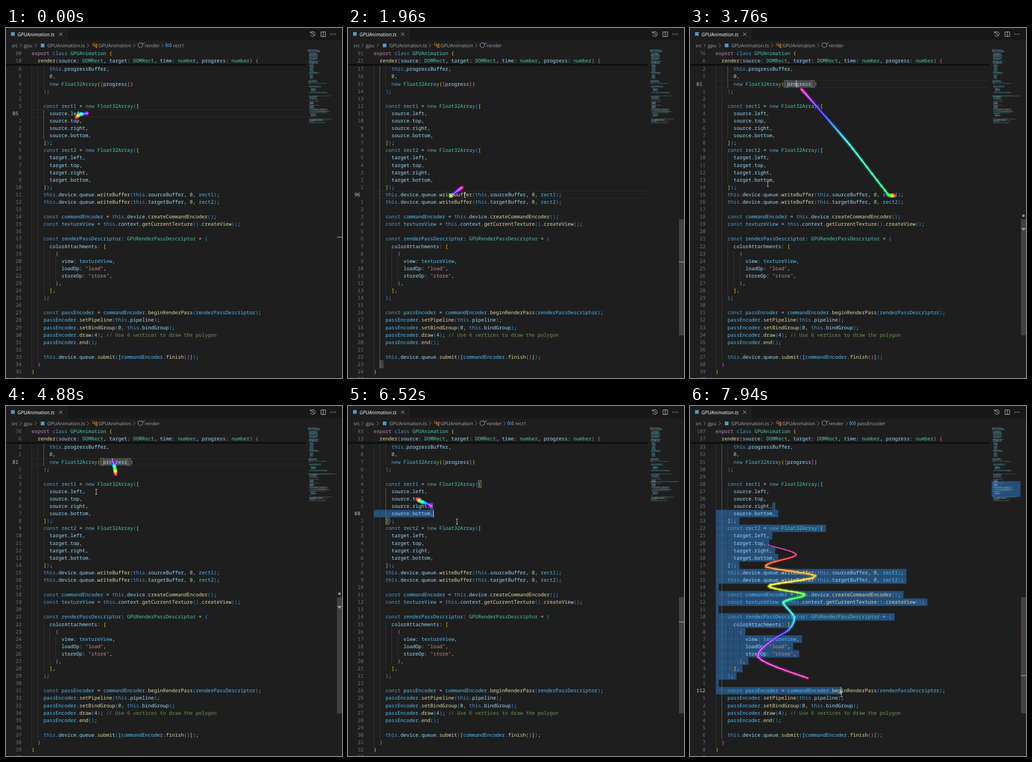
These frames come from a looping animation (734x763 px, 8000 ms). An HTML page:

```html
<!DOCTYPE html>
<html lang="en">
<head>
<meta charset="utf-8">
<title>Editor cursor trail</title>
<style>
  html, body { margin: 0; width: 100%; height: 100%; overflow: hidden; background: #1e1e1e; }
  svg { display: block; width: 734px; height: 763px; }
  text { white-space: pre; text-rendering: geometricPrecision; }
  .code { font: 10.86px "Noto Sans Mono", monospace; fill: #d4d4d4; }
  .ui { font: 10.4px "Open Sans", sans-serif; fill: #a9a9a9; }
  .tab { font: italic 10.9px "Open Sans", sans-serif; fill: #fff; }
  .num { fill: #6e7681; text-anchor: end; }
  .icon { fill: none; stroke: #ccc; }
</style>
</head>
<body>
<svg viewBox="0 0 734 763">
  <rect width="734" height="763" fill="#1e1e1e"/>
  <g id="under"></g>
  <g id="lines" class="code"></g>
  <g id="dots" class="code"></g>
  <g id="over"></g>
  <g id="top"></g>
  <g id="gutter" class="code"></g>
  <g id="crumb" class="ui"></g>
  <g id="minimap"></g>
  <g id="ruler"></g>
  <g id="trail" fill="none" stroke-linecap="round"></g>
  <path id="mouse" d="M-2-5.500h4M0-5.500v11M-2 5.500h4" fill="none" stroke="#ddd"/>
</svg>
<script>
const LOOP = 8000, X0 = 56, CW = 6.516, ROW = 16.09, FIRST = 79, LAG = 500, SEGMENTS = 90;
const $ = id => document.getElementById(id);

const code = `      this.progressBuffer,
      0,
      new Float32Array([progress])
    );

    const rect1 = new Float32Array([
      source.left,
      source.top,
      source.right,
      source.bottom,
    ]);
    const rect2 = new Float32Array([
      target.left,
      target.top,
      target.right,
      target.bottom,
    ]);
    this.device.queue.writeBuffer(this.sourceBuffer, 0, rect1);
    this.device.queue.writeBuffer(this.targetBuffer, 0, rect2);

    const commandEncoder = this.device.createCommandEncoder();
    const textureView = this.context.getCurrentTexture().createView();

    const renderPassDescriptor: GPURenderPassDescriptor = {
      colorAttachments: [
        {
          view: textureView,
          loadOp: "load",
          storeOp: "store",
        },
      ],
    };

    const passEncoder = commandEncoder.beginRenderPass(renderPassDescriptor);
    passEncoder.setPipeline(this.pipeline);
    passEncoder.setBindGroup(0, this.bindGroup);
    passEncoder.draw(4); // Use 6 vertices to draw the polygon
    passEncoder.end();

    this.device.queue.submit([commandEncoder.finish()]);
  }
}
`.split("\n");
const sticky = ["export class GPUAnimation {",
  "  render(source: DOMRect, target: DOMRect, time: number, progress: number) {"];
const indents = code.map((s, r) => s ? s.search(/\S/) : r < code.length - 1 ? 4 : 0);

const colX = c => X0 + c * CW;
const rowY = r => 81.6 + r * ROW;
const baseY = r => rowY(r) + 11.8;
const rulerY = line => 509 + (line - 96) * 4.87;
const mapY = line => 47 + (line - 1) * 1.36;
const clamp = (v, lo = 0, hi = 1) => Math.min(hi, Math.max(lo, v));
const rect = (x, y, w, h, fill, more = "") =>
  `<rect x="${x}" y="${y}" width="${w}" height="${h}" fill="${fill}" ${more}/>`;
const label = (x, y, s, more = "") => `<text x="${x}" y="${y}" ${more}>${s}</text>`;
const icon = (d, color = "#ccc") => `<path class="icon" style="stroke:${color}" d="${d}"/>`;

const cache = {};
function put(id, html) {
  if (cache[id] !== html) $(id).innerHTML = cache[id] = html;
}

// Syntax colours
const keywords = /^(class|const|new|this)$/;
const types = /^(DOMRect|number|Float32Array|GPU\w+)$/;
const consts = /^(rect[12]|commandEncoder|textureView|renderPassDescriptor|passEncoder)$/;
const bracketColors = ["#ffd700", "#da70d6", "#179fff"];
let depth = 0;

function tokenColor(s, next) {
  if (s.startsWith("//")) return "#6a9955";
  if (s[0] === '"') return "#ce9178";
  if (/[([{]/.test(s)) return bracketColors[depth++ % 3];
  if (/[)\]}]/.test(s)) return bracketColors[--depth % 3];
  if (/^\d/.test(s)) return "#b5cea8";
  if (!/^\w/.test(s)) return "#d4d4d4";
  if (s === "export") return "#c586c0";
  if (keywords.test(s)) return "#569cd6";
  if (types.test(s)) return "#4ec9b0";
  if (next === "(") return "#dcdcaa";
  return consts.test(s) ? "#4fc1ff" : "#9cdcfe";
}
function tokens(line) {
  const parts = line.match(/\/\/.*|"[^"]*"|[()[\]{}]|\w+|[^\w"()[\]{}\/]+/g) || [];
  return parts.map((s, i) => ({ s, color: tokenColor(s, parts[i + 1]) }));
}
const paint = list => list.map(k => `<tspan fill="${k.color}">${k.s}</tspan>`).join("");

const stickyTokens = sticky.map(tokens);
depth = 3;
const lineTokens = code.map(tokens);
put("lines", lineTokens.map((l, i) => label(X0, baseY(i), paint(l))).join(""));

// Window chrome and sticky header
const chevron = x => icon(`M${x - 2} 34l4 4l-4 4`, "#8a8a8a");
const square = (x, y) => rect(x, y, 8, 8, "#519aba");
put("top",
  rect(0, 0, 734, 81, "#1e1e1e") + rect(133, 0, 601, 27, "#181818") + rect(132, 0, 1, 27, "#2b2b2b") +
  rect(0, 79, 654, 2, "#080808") + rect(0, 81, 654, 1.5, "#151515") +
  square(11, 9) + label(25, 17.5, "GPUAnimation.ts", 'class="tab"') +
  icon("M116 10l7 7m0-7l-7 7") +
  icon("M666 10a5.2 5.2 0 1 1-.6 5M665 7v4h4M670.5 10v4l3 1.5") +
  icon("M688 8.5h10v10h-10zM693 8.5v10") +
  `<path d="M710 13.500h10" stroke="#ccc" stroke-width="2" stroke-linecap="round" stroke-dasharray="0 4.500"/>` +
  `<g class="ui">` + label(12, 42, "src") + label(39, 42, "gpu") + square(76, 34) +
  label(90, 42, "GPUAnimation.ts") + label(202, 42, "GPUAnimation") + label(303, 42, "render") + `</g>` +
  [32, 65, 179, 280].map(chevron).join("") +
  icon("M188 36l3.5-3.5l3 3l-3.5 3.5zM193 37h3M194 37v4h2M197 35h2v3h-2zM197 40h2v3h-2z", "#ee9d28") +
  icon("M293.5 32l5 2.5v5.5l-5 3l-5-3v-5.5zl5 2.5l5-2.5", "#b9a0dc") +
  `<g class="code">` + stickyTokens.map((l, i) => label(X0, 58.8 + i * 16, paint(l))).join("") + `</g>`);

// Minimap: [first line, count, indent, length]
const blocks = [[1, 4, 0, 42], [6, 12, 4, 30], [19, 5, 3, 36], [25, 12, 6, 14], [37, 3, 4, 34],
  [41, 7, 6, 12], [50, 4, 2, 34], [55, 1, 2, 74], [59, 3, 4, 40], [63, 5, 10, 18], [69, 2, 4, 70],
  [75, 1, 2, 76], [76, 3, 4, 28]];
const mapColors = ["#569cd6", "#4fc1ff", "#9cdcfe", "#4ec9b0"];
let seed = 7;
const random = () => (seed = seed * 16807 % 2147483647) / 2147483647;
const dash = (line, col, n, color) =>
  rect((659.5 + col * 0.68).toFixed(2), mapY(line).toFixed(2), (n * 0.68).toFixed(2), 0.95, color);
let mapText = "";
for (const [from, count, indent, length] of blocks)
  for (let i = 0; i < count; i++)
    for (let c = indent, end = indent + length * (0.75 + random() * 0.25); c < end;) {
      const n = 3 + random() * 9;
      mapText += dash(from + i, c, Math.min(n, end - c), mapColors[random() * 4 | 0]);
      c += n + 1;
    }
lineTokens.forEach((l, i) => {
  let c = 0;
  for (const { s, color } of l) {
    if (s.trim()) mapText += dash(FIRST + i, c, s.length, color);
    c += s.length;
  }
});
mapText = `<g opacity=".5">${mapText}</g>`;

// Caret positions; boxes are matched brackets, words are [row, text, colour]
const grey = "#4b4b4b";
const states = [
  { t: -600, row: 6, col: 18, crumb: "rect1" },
  { t: 1190, row: 17, col: 27, crumb: "", boxes: [[40, 2]] },
  { t: 2310, row: 17, col: 56, crumb: "", boxes: [[17, 33], [17, 61]],
    words: [[5, "rect1", "#04395e"], [17, "rect1", grey]], marks: [84, 96] },
  { t: 3330, row: 2, col: 27, crumb: "", boxes: [[2, 23], [2, 32]],
    words: [[2, "progress", grey]], marks: [75, 81] },
  { t: 5010, row: 8, col: 19, crumb: "rect1", boxes: [[5, 35], [10, 4]] }
];
const DRAG = 6440;

// Motion: [time, x, y]
const mousePath = [[150, 750, 695], [1150, 236, 362], [1900, 240, 364], [2250, 423, 364], [2650, 424, 365],
  [3250, 233, 122], [3760, 170, 340], [4880, 197, 187], [5000, 184, 219], [6300, 186, 220],
  [6520, 238, 252], [7440, 250, 335], [7750, 290, 540], [7850, 330, 618], [7940, 331, 628]];
const clicks = [[-500, 153, 196], [-250, 160, 189], [0, 177, 186], [400, 141, 188], [830, 165, 171],
  [1205, 175, 177], [1330, 221, 327], [1390, 232, 360], [1750, 224, 366], [2090, 262, 338], [2400, 250, 355],
  [2590, 398, 363], [2660, 421, 362], [3260, 448, 366], [3510, 435, 365], [3570, 345, 250],
  [3760, 243, 133], [3840, 233, 122], [4380, 240, 150], [4880, 233, 122], [5120, 226, 130],
  [5280, 180, 218], [6020, 150, 202], [6270, 157, 207], [6520, 182, 219]];
const drag = [[7000, 150, 246], [7440, 170, 302], [7490, 232, 324], [7545, 165, 350], [7570, 275, 371],
  [7600, 172, 392], [7650, 250, 411], [7730, 204, 430], [7760, 228, 462], [7797, 218, 485],
  [7860, 184, 508], [7900, 148, 545], [7940, 256, 593], [8000, 325, 618]];
const trailPath = clicks.concat(drag);

// Monotone cubic through the points, so that nothing overshoots
function at(path, t) {
  let i = 0;
  while (i < path.length - 2 && path[i + 1][0] <= t) i++;
  const [t0] = path[i], [t1] = path[i + 1], h = t1 - t0;
  const u = clamp((t - t0) / h), v = 1 - u;
  return [1, 2].map(k => {
    const slope = j => path[j + 1] && path[j] ? (path[j + 1][k] - path[j][k]) / (path[j + 1][0] - path[j][0]) : 0;
    const tangent = j => {
      const a = slope(j - 1), b = slope(j);
      return a * b > 0 ? 2 * a * b / (a + b) : 0;
    };
    return path[i][k] * v * v * (1 + 2 * u) + path[i + 1][k] * u * u * (3 - 2 * u) +
      h * u * v * (tangent(i) * v - tangent(i + 1) * u);
  });
}

// Glow, stroke and bright core
const layers = [[2.6, 0.22, 55], [1, 1, 58], [0.4, 0.9, 82]].map(([scale, opacity, light]) => {
  const lines = Array.from({ length: SEGMENTS }, () => {
    const el = document.createElementNS("http://www.w3.org/2000/svg", "line");
    el.setAttribute("opacity", opacity);
    $("trail").append(el);
    return el;
  });
  return { scale, light, lines };
});
function drawTrail(t) {
  const points = Array.from({ length: SEGMENTS + 1 }, (_, i) => at(trailPath, t - LAG * i / SEGMENTS));
  for (const { scale, light, lines } of layers)
    lines.forEach((el, i) => {
      const u = i / SEGMENTS, [a, b] = [points[i], points[i + 1]];
      const attrs = { x1: a[0], y1: a[1], x2: b[0], y2: b[1],
        stroke: `hsl(${(685 - 385 * u) % 360} 100% ${light}%)`,
        "stroke-width": 3.2 * scale * Math.min(1, (1 - u) * 4 + 0.25) };
      for (const k in attrs) el.setAttribute(k, attrs[k]);
    });
}

function stateAt(t) {
  const s = { boxes: [], words: [], marks: [], ...states.findLast(s => s.t <= t) };
  if (t < DRAG) return s;
  const [x, y] = at(mousePath, t - 70);
  s.anchor = { row: s.row, col: s.col };
  s.row = clamp(Math.floor((y - 81.6) / ROW), 9, 33);
  s.col = Math.min(code[s.row].length, Math.round((x - X0) / CW));
  s.t = t;
  if (s.row > 9) s.boxes = [];
  if (s.row === 33) s.crumb = "passEncoder";
  return s;
}

// Indent guides, the one around the caret brighter
function drawGuides(row) {
  const nested = r => indents[r] > 4;
  let from = row, to = row;
  while (nested(from - 1)) from--;
  while (nested(to + 1)) to++;
  let out = "";
  indents.forEach((indent, r) => {
    for (let c = 0; c < indent; c += 2) {
      const active = nested(row) ? c === 4 && r >= from && r <= to : c === 2;
      out += rect(Math.round(colX(c)), rowY(r), 1, ROW, active ? "#6a6a6a" : "#373737");
    }
  });
  return out;
}

function drawEditor(t) {
  const s = stateAt(t), line = FIRST + s.row, a = s.anchor;
  const settled = t - s.t > 200;
  const words = settled ? s.words : [], marks = settled ? s.marks : [];
  let under = "", dots = "", map = "";

  if (a) {
    for (let r = a.row; r <= s.row; r++) {
      const from = r === a.row ? a.col : 0, last = r === s.row;
      const to = last ? s.col : code[r].length;
      under += rect(colX(from), rowY(r), (to - from + (last ? 0 : 1)) * CW, ROW + 0.1, "#264f78");
      const spaces = code[r].slice(from, to).replace(/\S/g, "\u00a0").replace(/ /g, "·");
      dots += label(colX(from), baseY(r), spaces, 'fill="#fff" opacity=".25"');
    }
    map += rect(659, mapY(FIRST + a.row + 1) - 1.5, 63, (s.row - a.row) * 1.36 + 0.6, "#264f78");
  } else {
    for (const y of [rowY(s.row), rowY(s.row + 1) - 1]) under += rect(X0, y, 598, 1, "#2b2b2b");
  }
  for (const [r, word, fill] of words)
    under += rect(colX(code[r].indexOf(word)), rowY(r), word.length * CW, ROW, fill);
  if (marks.length) map += rect(659, mapY(marks[0]), 63, 1, "#5a5a5a");
  under += drawGuides(s.row);
  for (const [r, c] of s.boxes)
    under += rect(colX(c) + 0.5, rowY(r) + 0.5, CW, ROW - 1, "#243024", 'stroke="#888"');

  put("under", under);
  put("dots", dots);
  put("over", (t - s.t) % 1060 < 530 ? rect(colX(s.col) - 0.3, rowY(s.row), 1.4, ROW, "#c8c8c8") : "");
  put("minimap", map + mapText);

  let gutter = label(34, 58.8, line - 5, 'class="num"') + label(34, 74.8, line - 75, 'class="num"');
  code.forEach((_, r) => gutter += r === s.row
    ? label(14, baseY(r), line, 'fill="#ccc"')
    : label(34, baseY(r), Math.abs(r - s.row), 'class="num"'));
  put("gutter", gutter);

  put("crumb", s.crumb && chevron(342) + label(365, 42, s.crumb) +
    icon("M351.5 34h-2v7h2M358.5 34h2v7h-2M352.5 36.5l2.5-1.5l2.5 1.5v2.5l-2.5 1.5l-2.5-1.5z", "#75beff"));

  const fade = clamp((t - 150) / 150);
  let ruler = rect(723, 417, 11, 253, "#797979", `opacity="${(fade * 0.4).toFixed(2)}"`);
  if (a) for (let y = 457; y < rulerY(line) - 3; y += 9) ruler += rect(723, y, 11, 1, "#6a3040");
  for (const m of marks) ruler += rect(726, rulerY(m), 5, 5, "#a58a9a");
  put("ruler", ruler + rect(723, rulerY(line), 11, 1.5, "#a0a0a0"));
}

function frame(now) {
  const t = now % LOOP;
  drawEditor(t);
  drawTrail(t);
  $("mouse").setAttribute("transform", `translate(${at(mousePath, t)})`);
  requestAnimationFrame(frame);
}
requestAnimationFrame(frame);
</script>
</body>
</html>
```
